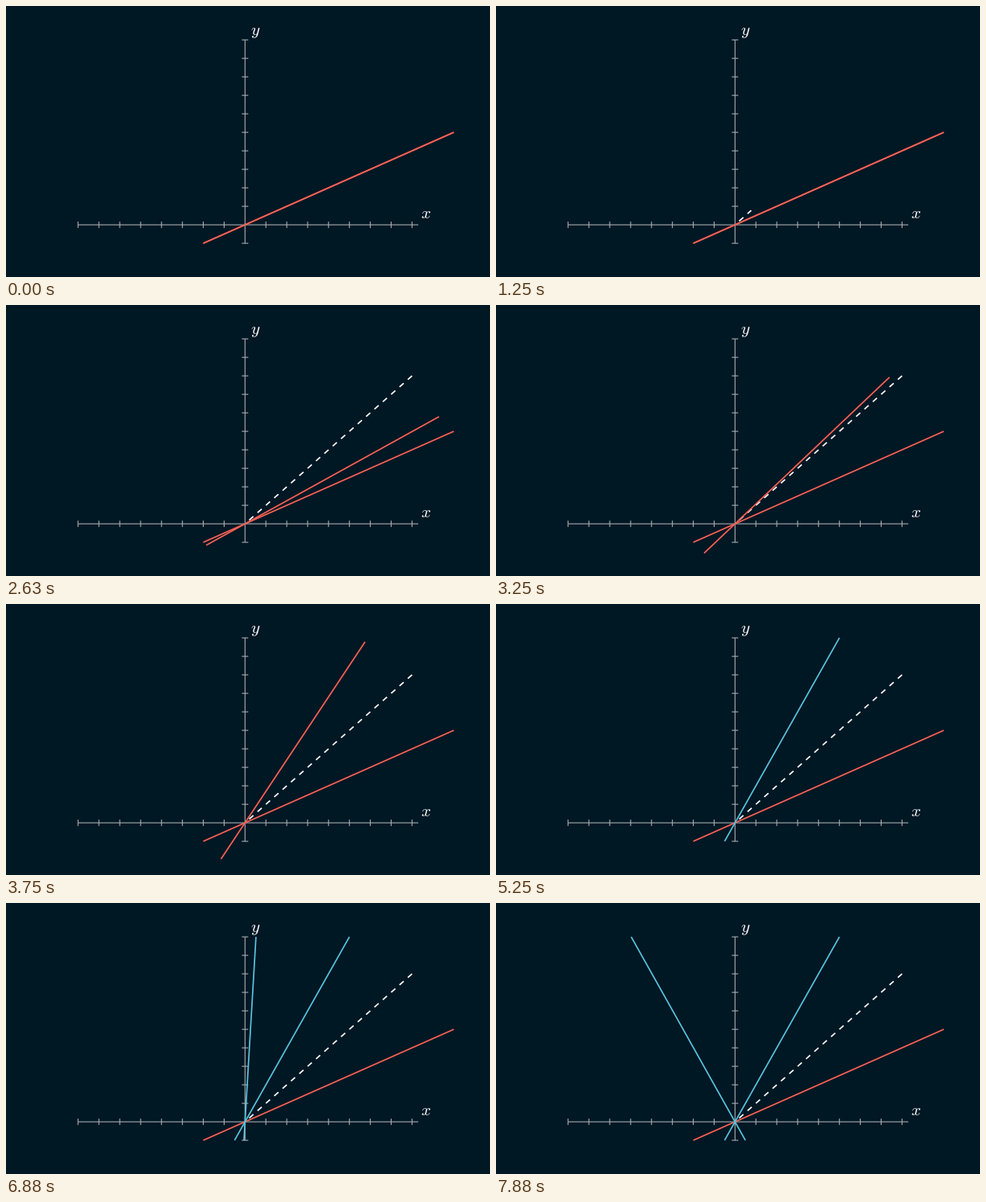
Animation of 600 by 337 pixels, one loop 8 s. Source, as a matplotlib script:

```python
import numpy as np
import matplotlib.pyplot as plt
from matplotlib.animation import FuncAnimation
from matplotlib.collections import LineCollection
from matplotlib.colors import to_rgb

W, H, DPI = 600, 337, 100
STEP, LOOP = 125, 8000
BG, GREY, RED, BLUE = "#001724", "#a8aeb2", "#fc6255", "#58c4dd"
ORIGIN = np.array([296.3, 272.1])
UNIT = np.array([25.88, 23.0])

# Start times and durations in ms
DASH, DASH_T = 970, 1000
FLIP, FLIP_T, FLIP_ANGLE = 2040, 1930, np.radians(137.7)
MORPH, MORPH_T = 3975, 1000
MIRROR, MIRROR_T = 5942, 2000
N_DASHES = 20


def px(width):
    return width * 72 / DPI


def progress(t, start, length):
    return min(max((t - start) / length, 0), 1)


def smooth(t):
    def sig(v):
        return 1 / (1 + np.exp(-v))
    low = sig(-5)
    return min(max((sig(10 * (t - 0.5)) - low) / (1 - 2 * low), 0), 1)


def offsets(*points):
    """Axis units to pixel offsets from the origin, y pointing up."""
    return np.array(points, float) * UNIT


def to_stage(offs):
    return ORIGIN + np.asarray(offs) * [1, -1]


def mix(a, b, k):
    return tuple((1 - k) * np.array(to_rgb(a)) + k * np.array(to_rgb(b)))


def flip_diagonal(offs, angle):
    """Turn about the 45 degree axis in depth, seen from the front."""
    x, y = offs.T
    mid, half = (x + y) / 2, (x - y) / 2 * np.cos(angle)
    return np.column_stack([mid + half, mid - half])


fig = plt.figure(figsize=(W / DPI, H / DPI), dpi=DPI, facecolor=BG)
ax = fig.add_axes([0, 0, 1, 1])
ax.set_xlim(0, W)
ax.set_ylim(H, 0)
ax.axis("off")


def draw_line(offs, color, width, z):
    pts = to_stage(offs)
    line, = ax.plot(pts[:, 0], pts[:, 1], color=color, lw=px(width),
                    solid_capstyle="butt", snap=False, zorder=z)
    return line


def place(line, offs):
    pts = to_stage(offs)
    line.set_data(pts[:, 0], pts[:, 1])


def draw_axes():
    draw_line(offsets((-8, 0), (8.3, 0)), GREY, 1.1, 1)
    draw_line(offsets((0, -1), (0, 10)), GREY, 1.1, 1)
    for i in range(-8, 9):
        if i:
            draw_line(offsets((i, 0), (i, 0)) + [[0, -4], [0, 4]], GREY, 1.1, 1)
    for j in range(-1, 11):
        if j:
            draw_line(offsets((0, j), (0, j)) + [[-4, 0], [4, 0]], GREY, 1.1, 1)
    for name, x, y in (("y", 303.2, 36), ("x", 513.6, 263.5)):
        ax.text(x, y, f"${name}$", color="white", size=px(21),
                math_fontfamily="cm", ha="left", va="baseline")


draw_axes()
half_line = offsets((-2, -1), (10, 5))
double_line = offsets((-0.5, -1), (5, 10))
diagonal = offsets((8, 8))[0]

draw_line(half_line, RED, 1.7, 3)
dashes = LineCollection([], colors="white", linewidths=px(1.7),
                        capstyle="butt", zorder=2)
ax.add_collection(dashes)
turning = draw_line(half_line, RED, 1.7, 4)
mirrored = draw_line(double_line, BLUE, 1.7, 5)


def dash_segments(k):
    drawn = k * N_DASHES
    segs = []
    for i in range(N_DASHES):
        part = min(max(drawn - i, 0), 1)
        if part > 0:
            a = (i + 0.5) / N_DASHES
            b = a + 0.5 * part / N_DASHES
            segs.append(to_stage([diagonal * a, diagonal * b]))
    return segs


def update(i):
    t = i * STEP
    dashes.set_segments(dash_segments(smooth(progress(t, DASH, DASH_T))))

    flipped = flip_diagonal(half_line, FLIP_ANGLE * progress(t, FLIP, FLIP_T))
    k = smooth(progress(t, MORPH, MORPH_T))
    place(turning, (1 - k) * flipped + k * double_line)
    turning.set_color(mix(RED, BLUE, k))

    turn = np.pi * progress(t, MIRROR, MIRROR_T)
    place(mirrored, double_line * [np.cos(turn), 1])
    mirrored.set_visible(t > MIRROR)
    return dashes, turning, mirrored


anim = FuncAnimation(fig, update, frames=LOOP // STEP, interval=STEP,
                     repeat=True, repeat_delay=0, blit=False)
plt.show()
```
